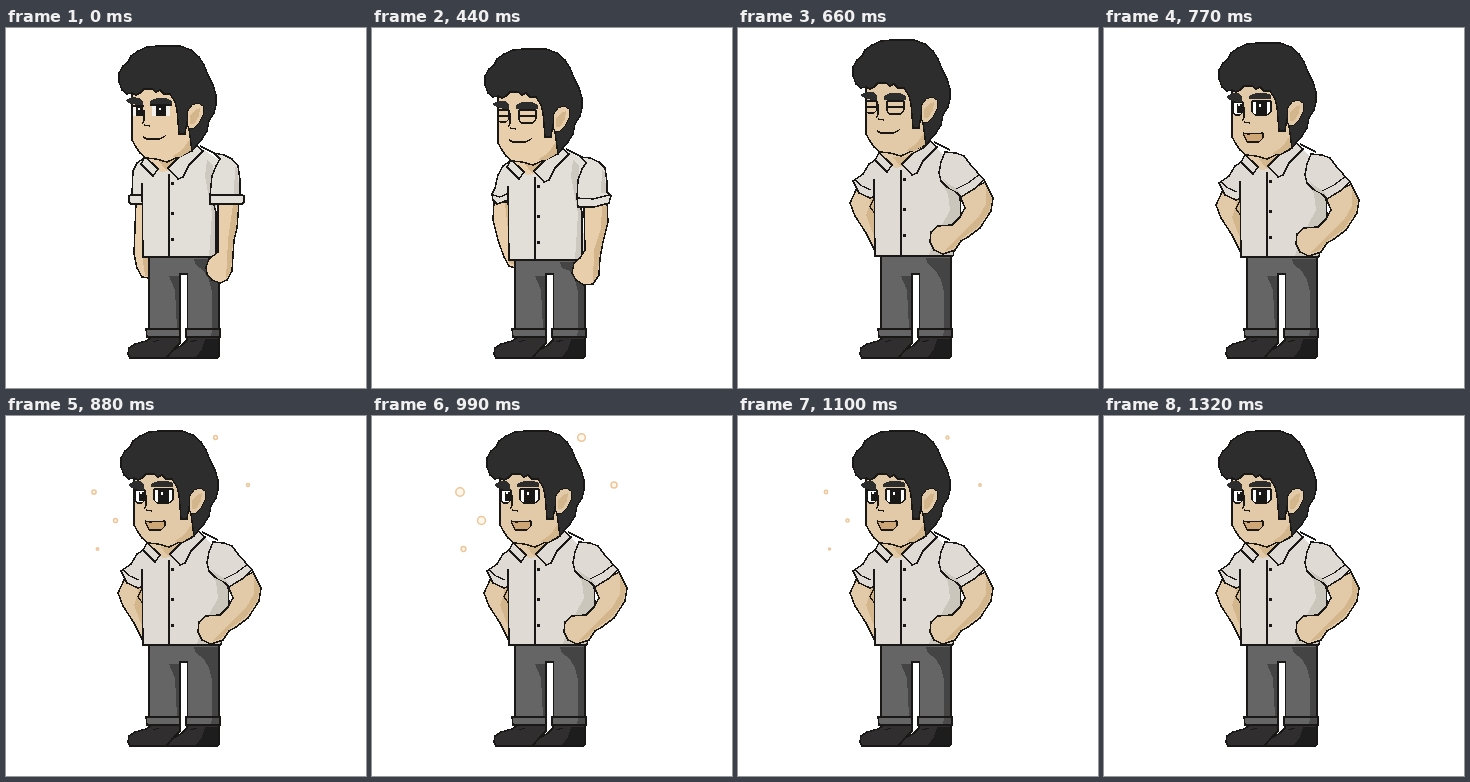
An HTML page for the animation above (1650 ms loop, 360x360 px).

```html
<!DOCTYPE html>
<html lang="en">
<head>
<meta charset="utf-8">
<style>
html, body { margin: 0; width: 100%; height: 100%; overflow: hidden; background: #fff; }
svg { display: block; width: 360px; height: 360px; stroke-linejoin: round; }
</style>
</head>
<body>
<svg id="stage" viewBox="0 0 360 360" shape-rendering="crispEdges"></svg>
<script>
const INK = '#191817', HAIR = '#2d2d2d', TAN = '#d3b68b';
const LOOP = 1650;

const area = (d, fill, stroke = INK, width = 1.5) =>
  `<path d="M${d}Z" fill="${fill}" stroke="${stroke}" stroke-width="${width}"/>`;
const flat = (d, fill) => area(d, fill, 'none');
const line = (d, width = 1.5) =>
  `<path d="M${d}" fill="none" stroke="${INK}" stroke-width="${width}"/>`;
const box = (x, y, w, h, fill) =>
  `<rect x="${x}" y="${y}" width="${w}" height="${h}" fill="${fill}"/>`;
const move = (x, y, body) => `<g transform="translate(${x} ${y})">${body}</g>`;

const eyes = {
  calm: () =>
    box(127, 78, 10, 10, '#f4f1ec') + box(130, 77, 7, 11, INK) + box(132, 80, 2, 2, '#fff') +
    box(146, 78, 18, 10, '#f4f1ec') + box(150, 77, 10, 11, INK) + box(153, 80, 2, 2, '#fff') +
    line('126 78H138M144 77H166', 1.3) +
    flat('120 72L126 69L133 70L137 74V77H131L122 75', HAIR) +
    flat('144 73L151 70H160L166 73V76H144', HAIR),
  shut: skin =>
    area('126 79H137V88L134 91H128L126 89', skin, INK, 1.2) +
    area('147 79H164V88L161 92H149L147 89', skin, INK, 1.2) +
    line('126 85H137M147 85H164', 1.2) +
    flat('121 72L127 70H133L137 74V78H131L122 75', HAIR) +
    flat('144 74L150 71H160L166 74V78H144', HAIR),
  open: () =>
    area('127 77H137V87L134 90H129L127 87', '#fff', INK, 1.3) + box(131, 79, 5, 9, INK) +
    area('146 76H165V87L161 90H149L146 87', '#fff', INK, 1.3) + box(150, 77, 11, 12, INK) +
    box(132, 79, 2, 2, '#fff') + box(153, 79, 2, 3, '#fff') +
    flat('121 71L127 68H133L136 72V77H130L122 74', HAIR) +
    flat('143 71L150 68H160L165 70V74H143', HAIR)
};

function head({ skin, eye, grin }) {
  const smile = grin
    ? area('137 108L142 109L157 108V113L153 117H141', '#cfa777', INK, 1.3)
    : line('137 109L141 111H153L158 109L160 107', 1.4);
  return area('126 64V112L130 119L134 125L140 130L150 131L161 134L174 128L186 122L192 104L190 68L166 58H136', skin) +
    flat('166 129L177 121L185 109L186 122L174 129', TAN) +
    area('121 66L116 62L113 54V45L117 38L122 34L125 28L132 23L141 19L152 18L174 18L185 22L193 29L198 37L202 47L207 57L210 67V77L208 85L203 93L201 103L196 111L190 118L186 123L183 101L181 94L179 106H173L171 82L169 74L164 66L158 66L154 62L150 64L146 61H138L134 65L130 67L126 65', HAIR) +
    area('181 97V84L186 77L192 75L197 78V87L193 95L188 100H183', skin, INK, 1) +
    flat('184 96V87L189 82L194 80L193 88L188 96', TAN) +
    line('138 82V93L136 96M138 97L144 98', 1.2) +
    eyes[eye](skin) + smile;
}

const legs = top =>
  area(`143 ${top}H213V301H181.5V246H174V301H143`, '#656565') +
  flat('163 248H173V300H171L169 262', '#444') +
  flat(`188 ${top + 2}H212V300H206V264L203 252L198 243L190 ${top + 8}`, '#444') +
  box(175, 247, 6, 61, '#fff') +
  area('124 330L122 326L123 320L129 316L140 313L146 309H174V315L168 321L160 330', '#302e2e') +
  area('161 330L166 323L176 317L181 312V309H213V328L211 330', '#302e2e') +
  flat('199 311H212V329H190L196 321', '#1e1d1d') +
  line('147 314L153 312M184 314L191 312', 1) +
  area('140 301H174V309H141', '#656565') +
  area('180 301H214V309H180', '#656565') +
  flat('206 302H213V308H205', '#4b4b4b');

// Limb shapes for the three arm poses; 'back' sits behind the shirt.
const arms = {
  down: {
    back: (s, c) =>
      area('130 174L129 200L128 226L131 240L136 249L143 250V175', s) +
      flat('136 178V226L139 248H143V178', TAN) +
      area('138 130L131 135L127 143L126 166L123 168V174L125 176H140L145 143', c) +
      line('124 167H137', 1.3),
    front: (s, c, d) =>
      area('212 174H233L231 200L228 212L226 243L221 252L214 255L206 252L201 246L200 239L203 231L212 224', s) +
      flat('227 177H232L230 200L227 212L225 243L220 251L222 212', TAN) +
      area('208 125L218 127L226 131L232 138L234 152V166L238 168V174L236 176H204V167L206 148L210 138L214 131', c) +
      flat('229 139L232 142L233 166H228', d) +
      line('204 167H237', 1.3)
  },
  bent: {
    back: (s, c) =>
      area('122 174L121 192L126 212L132 229L137 238L143 240V174', s) +
      flat('133 175L136 203L137 235L143 237V174', TAN) +
      area('138 133L131 138L126 147L123 160L120 166L121 172L125 176L136 172L144 171V144', c) +
      line('121 167L128 169L135 166', 1.3),
    front: (s, c, d) =>
      area('212 178L235 175L236 194L231 214L228 230L227 247L221 256L212 257L204 252L200 245L202 235L208 230L213 222', s) +
      flat('230 178H235V195L230 214L227 230L226 246L221 254L222 222L229 200', TAN) +
      area('209 129L218 130L227 134L233 140L235 154V164L239 168L237 175L222 179H206L205 170L206 152L210 141L214 135', c) +
      flat('230 142L233 145L234 165H229', d) +
      line('205 170L221 171L237 167', 1.3)
  },
  hips: {
    back: (s, c) =>
      area('118 162L112 175L117 188L128 205L136 221L140 219V168', s) +
      flat('133 170L131 179L128 187L134 203L140 216V168', TAN) +
      area('139 131L131 136L125 146L115 153L121 165L132 170L141 167L145 143', c) +
      line('117 152L124 158L133 162M136 170L132 179L138 187', 1.3),
    front: (s, c, d) =>
      area('222 168L247 154L255 170L253 183L242 200L230 209L223 213L217 222L205 226L196 222L192 214L193 204L200 198L214 197L222 189L227 180', s) +
      flat('248 159L254 171L251 183L240 199L223 211L216 220L205 224L221 208L240 190L248 176', TAN) +
      area('207 124L218 125L226 128L232 136L239 144L246 152L236 161L223 169L217 163L209 159L203 153L201 145L203 134', c) +
      flat('205 151L211 156L219 161L223 166L211 160', d) +
      line('218 161L230 155L242 146', 1.3)
  }
};

// Right side of the shirt: outline, its visible edge, and the shaded strip.
const sides = {
  straight: hem => ({
    body: `213 132V178H210V${hem}`,
    edge: `208 177L210 184V${hem}`,
    dark: `201 132L199 148L203 170L206 186L203 ${hem}H210V178L207 160V138`
  }),
  hips: hem => ({
    body: `206 128L222 160V188L215 ${hem}`,
    edge: `222 168L223 188L215 ${hem}`,
    dark: `203 154L210 166L212 182L204 197L190 ${hem}H215L222 188V168`
  })
};

function shirt({ cloth, shade, skin, arm, ty, hem }) {
  const { body, edge, dark } = (sides[arm] || sides.straight)(hem);
  const buttons = [155, 185, 211].map(y => box(165, y + ty - 1, 3, 3, INK)).join('');
  const collar =
    flat('138 129L147 137L154 144L163 143L187 122', skin) +
    flat('153 133L165 133L176 127L167 139L160 142', TAN) +
    area('139 129L135 136L141 142L147 148L152 141L146 135', cloth) +
    area('162 140L172 151L177 149L183 137L197 123L190 117L183 124L172 130', cloth) +
    line('194 118L210 126');
  return flat(`139 ${131 + ty}L136 ${150 + ty}L137 ${hem}H208L214 ${hem}L${body.split('L').reverse().join('L') && `${arm === 'hips' ? 222 : 210} 188`}L${body.split(/[VL]/)[0]}L192 ${118 + ty}`, cloth) +
    flat(`137 ${hem}L150 ${140 + ty}L192 ${118 + ty}L${body}`, cloth) +
    flat(dark, shade) +
    line(`136 ${155 + ty}L137 ${hem}H${arm === 'hips' ? 215 : 210}`) +
    line(edge) +
    line(`163 ${146 + ty}V${hem}`) + buttons +
    move(arm === 'hips' ? 2 : 0, ty, collar);
}

const bubbles = [[88, 76, 4.2], [109.5, 104.5, 4], [91.5, 133, 2.4], [209.5, 21.5, 3.8], [242, 69, 3]];
const sparkle = size => size ? bubbles.map(([x, y, r]) =>
  `<circle cx="${x}" cy="${y}" r="${r * size}" fill="#fff7ec" stroke="#ecc69b" stroke-width="1.5" shape-rendering="auto"/>`).join('') : '';

const light = { skin: '#e8ceab', cloth: '#e2dfd9', shade: '#cdc9c1' };
const warm = { skin: '#e2c9a7', cloth: '#dfdbd4', shade: '#cbc6bc' };
const stand = { ...light, arm: 'down', eye: 'calm', hx: 0, hy: 0, ty: 0, hem: 229 };
const crouch = { ...light, arm: 'bent', eye: 'shut', hx: 0, hy: 3, ty: 3, hem: 232 };
const rise = { ...warm, arm: 'hips', eye: 'shut', hx: 2, hy: -6, ty: -4, hem: 228 };
const proud = { ...warm, arm: 'hips', eye: 'open', grin: true, hx: 2, hy: -3, ty: -2, hem: 229 };

const steps = [
  [0, stand, 0], [440, crouch, 0], [660, rise, 0], [770, proud, 0],
  [880, proud, .5], [990, proud, 1], [1100, proud, .4], [1210, proud, 0]
];

function draw([, p, size]) {
  const arm = arms[p.arm], ay = p === proud ? 2 : 0;
  return move(0, ay, arm.back(p.skin, p.cloth)) +
    legs(p.hem) + shirt(p) +
    move(0, ay, arm.front(p.skin, p.cloth, p.shade)) +
    move(p.hx, p.hy, head(p)) + sparkle(size);
}

const stage = document.getElementById('stage');
let shown;
function tick() {
  const t = performance.now() % LOOP;
  const step = steps.findLast(s => s[0] <= t);
  if (step !== shown) stage.innerHTML = draw(shown = step);
  requestAnimationFrame(tick);
}
tick();
</script>
</body>
</html>
```
